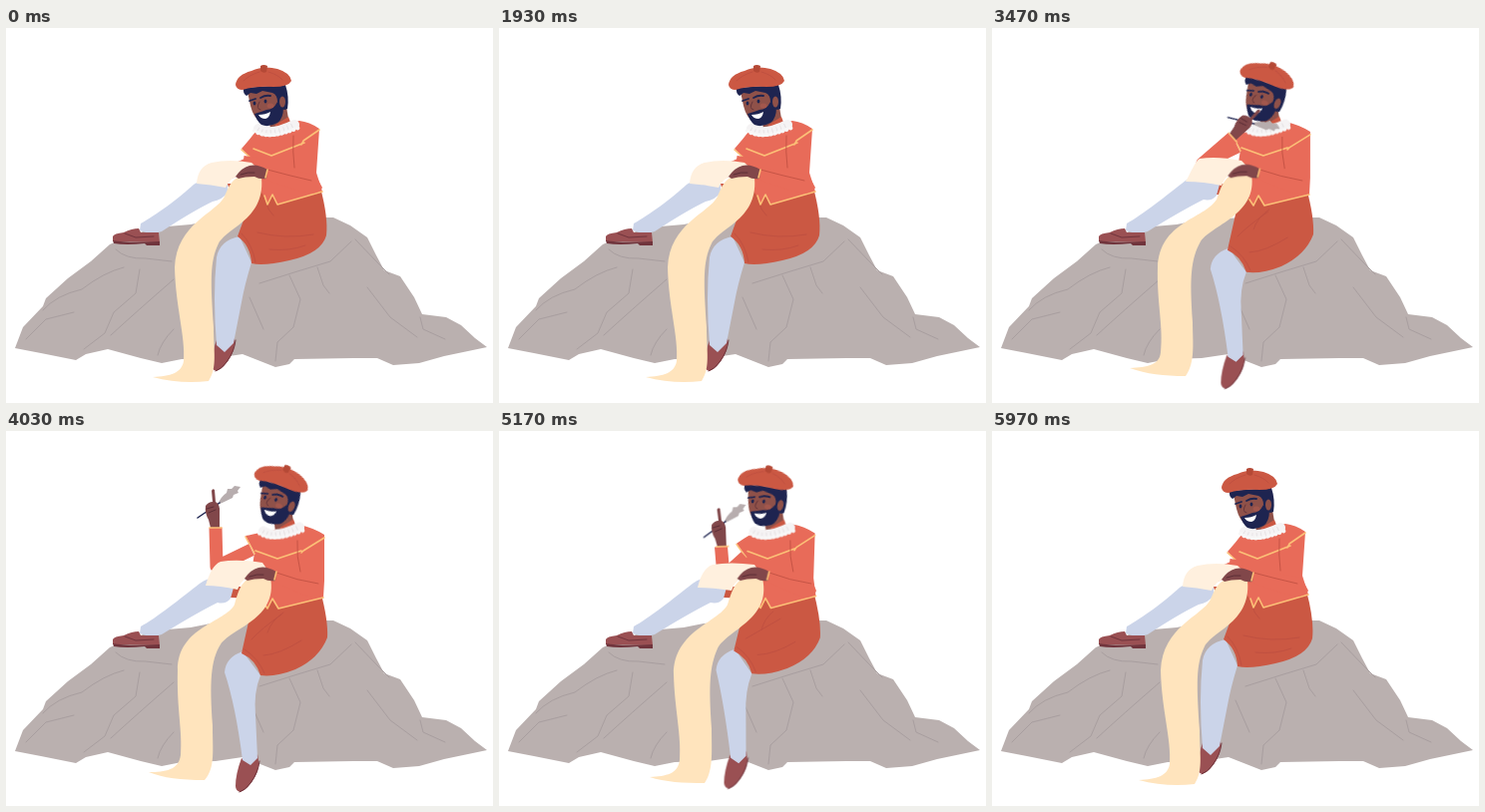
Animation, 488 px wide and 376 px high, one loop 6.01 s. Source, as an HTML page:

```html
<!DOCTYPE html>
<html lang="en">
<head>
<meta charset="utf-8">
<title>Poet on a rock</title>
<style>
html, body { margin: 0; width: 100%; height: 100%; overflow: hidden; background: #fff; }
svg { display: block; width: 488px; height: 376px; }
.line { fill: none; stroke-width: 1; stroke-linecap: round; stroke-linejoin: round; }
.cloth { fill: #e86b59; }
.dark { fill: #cb5843; }
.hose { fill: #cbd4e9; }
.skin { fill: #8f5149; }
.hand { fill: #81474a; }
.navy { fill: #1e2450; }
.shoe { fill: #9a5053; }
.gold { stroke: #fcc077; stroke-width: 1.6; }
.fold { stroke: #bd4f40; stroke-width: .8; }

/* all parts share one 6010 ms clock */
.a { animation: 6010ms ease-in-out infinite; }
.head { transform-origin: 270px 97px; animation-name: head; }
.ruff { animation-name: ruff; }
.torso { animation-name: torso; }
.trim { animation-name: trim; }
.knee { animation-name: knee; }
.leg { animation-name: leg; }
.foot { animation-name: foot; }
.shorts { animation-name: shorts; }
.hem { animation-name: hem; }
.sleeve { animation-name: sleeve; fill: none; stroke: #e86b59; stroke-width: 13; stroke-linejoin: round; }
.quill { transform-origin: 191px 87px; animation-name: quill; }
.sheet { animation-name: sheet; fill: #fff0de; }
.band { animation-name: band; fill: #ffe4bd; }
.forearm { animation-name: forearm; }
.cuff { animation-name: cuff; }
.grip { animation-name: grip; }

@keyframes head {
  0%, 39.43%, 92%, 100% { transform: none; }
  59.4%, 80.37% { transform: translate(1px, -2.5px) rotate(22deg); }
}
@keyframes ruff {
  0%, 39.43%, 92%, 100% { transform: none; }
  59.4%, 80.37% { transform: translate(5px, -.5px); }
}
@keyframes torso {
  0%, 39.43%, 92%, 100% { d: path("M250,104 Q244,112 236,121 L246,131 L244,145 L258,168 L262,177 L267,167 L272,177 L317,164 L311,145 L314,101 Q304,94 294,93 Z"); }
  59.4%, 80.37% { d: path("M258,101 Q246,104 240,105 L249,122 L247,135 L258,172 L262,178 L267,168 L273,178 L318,167 L319,150 L319,104 Q308,97 294,94 Z"); }
}
@keyframes trim {
  0%, 39.43%, 92%, 100% { d: path("M236,122 L246,131 M248,121 L266,128 L299,115 M314,102 L298,113 L296,117 M259,168 L262,177 L267,167 L272,177 L317,164"); }
  59.4%, 80.37% { d: path("M240,106 L249,123 M250,120 L272,128 L296,120 M319,107 L298,120 L296,122 M258,172 L262,178 L267,168 L273,178 L318,167"); }
}
@keyframes knee {
  0%, 39.43%, 99.33%, 100% { d: path("M135,196 C150,188 174,170 188,157 Q202,147 222,152 L222,165 Q217,172 207,174 Q188,183 156,204 Q146,208 134,203 Z"); }
  59.4%, 85% { d: path("M135,196 C150,188 176,167 194,153 Q208,142 230,150 L225,168 Q220,174 212,172 Q190,183 156,204 Q146,208 134,203 Z"); }
}
@keyframes leg {
  0%, 41.6%, 99.33%, 100% { d: path("M211,230 Q214,213 234,209 L246,235 Q239,258 236,275 L228,316 L219,325 L211,318 Q207,270 211,230 Z"); }
  59.4%, 80.37% { d: path("M219,242 Q220,227 237,221 L255,245 Q248,262 250,285 L252,328 L245,335 L237,330 Q230,275 219,242 Z"); }
}
@keyframes foot {
  0%, 40%, 99.33%, 100% { transform: translate(-24px, -18px); }
  47.75% { transform: translate(-18px, -9px); animation-timing-function: ease-out; }
  59.4%, 80.37% { transform: none; }
}
@keyframes shorts {
  0%, 41%, 99.33%, 100% { d: path("M250,160 L315,160 Q323,190 321,208 Q316,226 284,233 Q258,239 246,236 Q245,218 232,209 Z"); }
  59.4%, 80.37% { d: path("M250,160 L315,160 Q323,190 322,207 Q314,228 290,239 Q270,247 255,245 Q250,229 236,223 Z"); }
}
@keyframes hem {
  0%, 41%, 99.33%, 100% { d: path("M236,206 Q247,217 250,235 M252,205 Q280,212 308,207 M264,222 Q284,224 300,218 M268,188 Q262,182 261,176"); }
  59.4%, 80.37% { d: path("M239,219 Q253,228 259,243 M246,209 Q256,198 276,184 M258,225 Q274,224 296,210 M262,202 Q266,190 278,182"); }
}
@keyframes sleeve {
  0%, .5%, 11%, 21.2%, 32.1%, 39.43%, 95%, 100% { d: path("M245,129 L244,136 L212,150"); }
  5.5%, 16%, 24.5%, 28.3% { d: path("M245,129 L217,137 L212,150"); }
  47.75% { d: path("M246,126 L236,134 L216,150"); }
  57.74% { d: path("M246,119 L211,136 L241,110"); }
  67.05%, 80.37% { d: path("M246,119 L211,136 L210,97"); }
  86.02% { d: path("M247,126 L225,146 L222.5,116"); }
}
@keyframes quill {
  0%, 39.43%, 95%, 100% { transform: translate(13px, 52px) rotate(55deg); visibility: hidden; }
  48.3% { transform: translate(18px, 51px) rotate(55deg); visibility: hidden; }
  48.4% { transform: translate(18px, 51px) rotate(55deg); visibility: visible; }
  57.74% { transform: translate(45px, 2px) rotate(48deg); }
  67.05%, 80.37% { transform: none; }
  86.02% { transform: translate(13.5px, 19.5px) rotate(-2deg); visibility: visible; }
  94% { transform: translate(13px, 50px) rotate(54deg); visibility: visible; }
}
@keyframes sheet {
  0%, 39.43%, 99.33%, 100% { d: path("M191,156 C192,145 196,138 206,135 Q224,131 246,135 L255,143 Q226,145 220,160 Q205,157 191,156 Z"); animation-timing-function: ease-in; }
  47.75% { d: path("M191,157 C194,145 200,136 209,133 Q225,131 247,135 L256,145 Q228,146 221,160 Q206,158 191,157 Z"); animation-timing-function: ease-out; }
  57.74% { d: path("M194,154 C200,144 203,134 208,131 Q225,128 250,133 L259,142 Q235,142 230,158 Q212,154 194,154 Z"); }
  67.5%, 80.37% { d: path("M200,155 C204,142 208,134 215,131 Q232,128 257,132 L264,142 Q238,142 232,159 Q214,155 200,155 Z"); }
  86.02% { d: path("M199,157 C202,145 206,137 214,134 Q232,131 256,134 L263,144 Q238,143 233,160 Q214,157 199,157 Z"); }
}
@keyframes band {
  0%, 39.43%, 99.33%, 100% { d: path("M243,147 C226,148 223,160 219,169 C210,186 171,196 169,240 C170,280 180,310 178,334 C176,346 165,349 147,350 C165,355 185,356 203,354 C212,340 208,325 208,300 C205,255 204,234 213,216 C224,198 264,190 255,143 Z"); animation-timing-function: ease-in; }
  47.75% { d: path("M244,148 C226,149 222,160 218,172 C208,192 169,198 168,240 C167,280 176,310 174,333 C172,345 162,347 145,348 C162,353 180,354 199,353 C209,340 205,325 205,300 C202,255 202,234 211,216 C222,198 266,190 256,145 Z"); animation-timing-function: ease-out; }
  57.74% { d: path("M250,145 C232,146 230,160 225,172 C212,192 168,194 166,240 C165,275 172,300 169,325 C168,338 156,340 138,341 C155,347 172,349 194,349 C204,335 201,315 201,295 C198,250 199,232 209,214 C222,196 270,186 259,142 Z"); }
  67.5%, 80.37% { d: path("M254,145 C236,146 233,160 229,174 C220,192 172,196 172,240 C171,280 177,300 175,325 C173,340 160,342 143,342 C158,348 175,350 199,350 C210,338 207,320 207,295 C204,252 205,230 215,214 C228,196 276,188 264,142 Z"); }
  86.02% { d: path("M254,146 C236,147 234,160 229,174 C220,192 175,200 175,244 C176,280 183,305 181,330 C179,344 168,346 151,347 C166,352 185,353 206,353 C215,340 213,322 213,298 C210,255 211,236 219,218 C230,198 276,188 263,144 Z"); }
}
@keyframes forearm {
  0%, 39.43%, 99.33%, 100% { d: path("M262,141 Q285,142 310,147 L317,160 Q315,165 306,166 Q285,162 261,152 Z"); }
  69%, 84% { d: path("M271,141 Q290,147 314,151 L318,160 Q317,167 306,167 Q290,162 270,151 Z"); }
}
@keyframes cuff {
  0%, 39.43%, 99.33%, 100% { d: path("M262,142 Q284,148 306,153 M288,108 Q287,124 289,140"); }
  69%, 84% { d: path("M271,142 Q292,150 313,153 M292,110 Q291,126 295,141"); }
}
@keyframes grip {
  0%, 39.43%, 99.33%, 100% { transform: none; }
  69%, 84% { transform: translate(9px, -1px); }
}
</style>
</head>
<body>
<svg viewBox="0 0 488 376">
  <path fill="#bab0af" d="M9,321 L17,300 L37,279 L40,271 L62,251 L85,234 L104,217 L122,209 L150,200 L185,197 L205,193 L250,190 L328,190 L345,198 L362,210 L371,228 L379,243 L395,249 L409,270 L417,287 L441,290 L456,298 L470,311 L482,320 L439,329 L414,336 L388,338 L372,331 L348,331 L289,332 L284,337 L270,340 L237,327 L210,331 L176,332 L156,336 L135,331 L102,322 L80,327 L70,333 L35,326 Z"/>
  <path class="line" stroke="#a89e9f" d="M110,222 Q120,232 140,231 L166,234 M37,283 Q50,268 76,262 Q98,245 118,240 M134,242 L130,266 L108,285 L99,306 L78,322 M68,285 L40,292 L20,312 M168,252 Q130,285 105,308 M168,302 Q155,315 152,328 M244,270 L258,302 M254,256 L292,244 L325,234 L346,214 M312,240 L318,258 L324,266 M284,248 L295,272 L288,300 L272,315 L270,334 M362,260 L385,290 L412,310 M415,290 L418,302 L440,312 M350,212 L372,235 L384,247"/>

  <path class="dark" d="M222,156 L242,156 L242,168 L225,167 Z"/>
  <path class="a knee hose"/>
  <path class="shoe" d="M107,209 Q108,206 118,205 Q126,201 133,201 L135,205 L153,205 L154,215 L107,214 Z"/>
  <path fill="#70343c" d="M107,213 Q122,216 154,214 L154,218 L141,218 L139,216 Q120,218 108,216 Z"/>
  <path class="line" stroke="#70343c" d="M119,206 L130,210 L148,209"/>

  <g class="a foot">
    <path class="shoe" d="M236,328 Q244,336 252,324 Q255,337 250,346 Q243,359 235,362 Q230,361 230,356 Q230,344 236,328 Z"/>
    <path class="line" stroke="#70343c" d="M254,331 Q253,342 245,353 Q240,360 234,362"/>
  </g>
  <path class="a leg hose"/>
  <path class="a shorts dark"/>
  <path class="a hem line fold"/>

  <path class="a torso cloth"/>
  <path class="a trim line gold"/>

  <g class="a ruff">
    <path class="skin" d="M263,84 L281,79 L284,97 L265,103 Z"/>
    <path class="dark" d="M270,97 L283,89 L286,97 L268,104 Z"/>
    <path class="line" stroke="#f5f3f4" style="stroke-width:10" d="M253,101 Q264,109 289,97"/>
    <path class="line" stroke="#e6e2e4" style="stroke-width:6;stroke-dasharray:1 3.5;stroke-linecap:butt" d="M252,102 Q264,110 290,97"/>
    <path class="line" stroke="#f8f7f7" style="stroke-width:4;stroke-dasharray:.1 4" d="M249,103 Q262,113 293,100"/>
  </g>

  <g class="a head">
    <path class="skin" d="M242,64 L245,78 Q248,90 255,94 Q266,97 274,88 L278,60 L246,60 Z"/>
    <path class="navy" d="M249,86 Q256,84 261,82 Q268,82 272,74 L278,79 Q278,91 272,95 Q263,100 256,97 Q251,93 249,86 Z"/>
    <path fill="#fff" d="M253,87 Q260,87 265,84 Q264,90 260,91 Q255,91 253,87 Z"/>
    <path class="navy" d="M238,60 Q237,65 241,68 L245,65 L251,66 L257,63 L267,65 Q272,67 272,74 L276,81 L279,82 L282,81 Q284,69 280,57 Z"/>
    <ellipse class="skin" cx="277" cy="74" rx="3" ry="5.5"/>
    <path class="line" stroke="#1e2450" style="stroke-width:1.8" d="M244,73 L250,71 M255,70 Q260,67 265,68"/>
    <ellipse class="navy" cx="249" cy="75.5" rx="1.4" ry="1.9"/>
    <ellipse class="navy" cx="260" cy="73.5" rx="1.4" ry="1.9"/>
    <path class="line" stroke="#65343a" d="M254,74 Q250,81 255,82"/>
    <ellipse cx="265" cy="78" rx="3.5" ry="2.5" fill="#a2574d"/>
    <path class="dark" d="M230,57 Q231,47 246,43 Q258,37 272,41 Q285,45 286,53 Q283,59 268,59 Q250,58 237,62 Q231,62 230,57 Z"/>
    <path fill="#b54936" d="M255,43 L255,38 Q258,36 262,38 L261,44 Q258,46 255,43 Z"/>
    <path class="line fold" d="M254,44 Q244,47 238,53 M263,44 Q273,47 277,52"/>
  </g>

  <path class="a sleeve"/>
  <g class="a quill">
    <path fill="#b7adae" d="M212,74 Q215,66 221,62 L222,58 L226,58 L229,55 L235,56 L232,60 L233,62 L228,64 L227,67 Q219,71 212,74 Z"/>
    <path class="line" stroke="#1e2450" style="stroke-width:1.5" d="M192,87 L214,72"/>
    <path class="hand" d="M205,97 L203,89 Q199,82 200,75 Q203,71 207,71 L206,60 Q207,57 209,59 L210,71 Q215,74 214,82 L214,97 Z"/>
    <path class="line" stroke="#5c2e36" d="M201,78 L208,76 M203,82 L210,79"/>
    <path class="line gold" d="M204,97 L216,97"/>
  </g>

  <path class="a sheet"/>
  <path class="a band"/>

  <path class="a forearm cloth"/>
  <path class="a cuff line fold"/>
  <g class="a grip">
    <path class="hand" d="M230,149 Q236,140 244,138 Q252,136 262,142 L261,151 Q254,152 249,149 Q239,149 233,151 Z"/>
    <path class="line" stroke="#5c2e36" d="M235,147 Q243,144 249,145"/>
    <path class="line gold" d="M262,142 L260,150"/>
  </g>
</svg>
</body>
</html>
```
